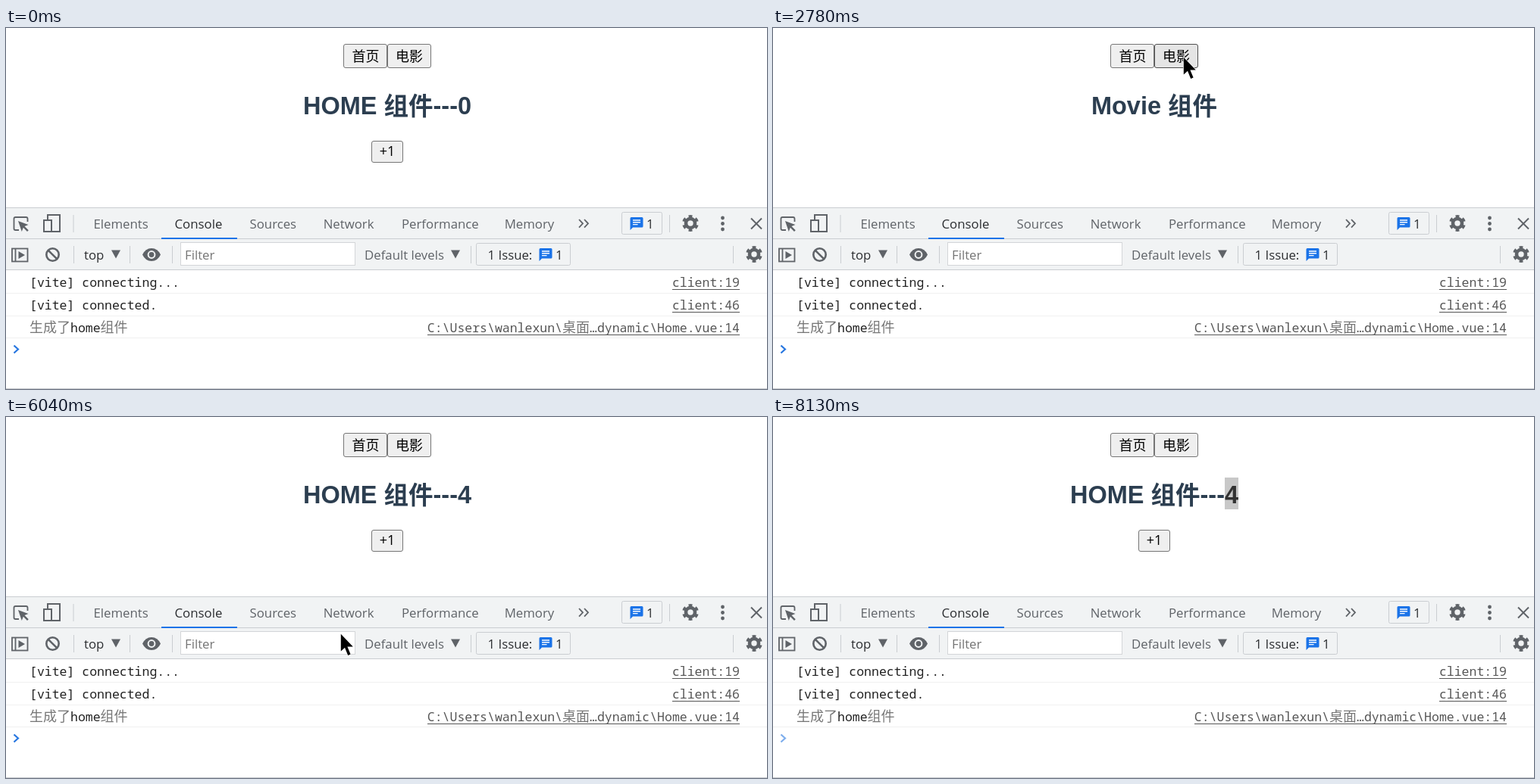
Write an HTML page that moves like this. It is 1004 px wide and 477 px high and loops after 8.26 s.

```html
<!DOCTYPE html>
<html lang="zh-CN">
<head>
<meta charset="utf-8">
<title>Dynamic components</title>
<style>
html, body { margin: 0; width: 100%; height: 100%; overflow: hidden; background: #fff; }
svg { display: block; width: 100%; height: 100%; }
text { white-space: pre; }
.ui { font: 16.8px "Open Sans", "Noto Sans", sans-serif; fill: #5f6368; }
.dark { fill: #2b2d30; }
.mono { font: 16.5px "Noto Sans Mono", "Noto Sans CJK SC", monospace; fill: #222; }
.link { fill: #555; text-anchor: end; }
.cjk { font-size: 18px; font-family: "Noto Sans CJK SC", sans-serif; font-weight: 300; fill: #777; }
.button { font: 18px "Open Sans", "Noto Sans CJK SC", sans-serif; text-anchor: middle; }
.title { font: bold 32.5px "Liberation Sans", "Noto Sans CJK SC", sans-serif; fill: #2c3e50; text-anchor: middle; }
.line { fill: none; stroke: #5f6368; stroke-width: 2; }
.thin { stroke-width: 1.8; }
.bold { stroke-width: 2.6; }
.chip { fill: #f1f3f4; stroke: #cacdd1; }
</style>
</head>
<body>
<svg viewBox="0 0 1004 477">
  <defs>
    <g id="gear" class="line">
      <circle r="6" stroke-width="4.6"/>
      <circle r="9.2" stroke-width="3.4" pathLength="12" stroke-dasharray="1 1" stroke-dashoffset="-.5"/>
    </g>
    <g id="message">
      <path d="M1.5 0H15.5Q17 0 17 1.5V12Q17 13.5 15.5 13.5H3.5L0 17V1.5Q0 0 1.5 0Z" fill="#1a73e8"/>
      <path d="M3.5 4H13.5M3.5 6.8H13.5M3.5 9.6H10" stroke="#fff" stroke-width="1.4"/>
    </g>
    <path id="down" d="M0 0H12L6 11Z" fill="#5f6368"/>
  </defs>

  <rect width="1004" height="477" fill="#fff"/>
  <g class="button">
    <g id="home"><rect x="445.5" y="21.5" width="57" height="31" rx="2.5"/><text x="474.5" y="44.3">首页</text></g>
    <g id="movie"><rect x="503.5" y="21.5" width="57" height="31" rx="2.5"/><text x="532" y="44.3">电影</text></g>
    <g id="plus"><rect x="482.5" y="149.5" width="41" height="28" rx="2.5"/><text x="503" y="169">+1</text></g>
  </g>
  <rect id="selection" x="596" y="80" width="18" height="42"/>
  <text id="homeTitle" class="title" x="503" y="114">HOME <tspan dy="1">组件</tspan><tspan dy="-1">---</tspan><tspan id="count">0</tspan></text>
  <text id="movieTitle" class="title" x="503" y="114">Movie <tspan dy="1">组件</tspan></text>

  <!-- toolbars -->
  <rect y="237" width="1004" height="83" fill="#f1f3f4"/>
  <path d="M0 237.5H1004M0 278.5H1004M0 319.5H1004M0 476.5H1004" stroke="#cacdd1"/>
  <path d="M89 247V270M875.5 247V270M89.5 288V311M163.5 288V311M219.5 288V311M613.5 288V311M959.5 288V311" stroke="#cacdd1"/>
  <rect x="205" y="277" width="100" height="2" fill="#1a73e8"/>

  <path class="line thin" d="M17 267H12.5Q10.5 267 10.5 265V252Q10.5 250 12.5 250H26.5Q28.5 250 28.5 252V256"/>
  <path d="M16 255L29.5 260L24.5 262L29.8 267.3L28 269L22.8 263.8L20.8 269Z" fill="#5f6368"/>
  <path class="line" d="M55 253V247H71V269H61"/>
  <rect class="line" x="50" y="254" width="10" height="15"/>
  <g class="ui">
    <text x="115.5" y="265">Elements</text>
    <text class="dark" x="222.5" y="265">Console</text>
    <text x="321.5" y="265">Sources</text>
    <text x="418.7" y="265">Network</text>
    <text x="522" y="265">Performance</text>
    <text x="657.7" y="265">Memory</text>
  </g>
  <path class="line thin" d="M756 253L761 258.3L756 263.6M763 253L768 258.3L763 263.6"/>
  <rect class="chip" x="812.5" y="243.5" width="53" height="29" rx="2"/>
  <use href="#message" x="823.5" y="250"/>
  <text class="ui dark" x="845" y="265">1</text>
  <use href="#gear" x="903" y="258"/>
  <g fill="#5f6368"><circle cx="945.5" cy="251" r="2.4"/><circle cx="945.5" cy="258.5" r="2.4"/><circle cx="945.5" cy="266" r="2.4"/></g>
  <path class="line" d="M983 251.5L997 265.5M997 251.5L983 265.5"/>

  <rect class="line thin" x="8" y="291.5" width="20.5" height="17"/>
  <path class="line thin" d="M12.5 292V308"/>
  <path d="M16.5 295V305L25 300Z" fill="#5f6368"/>
  <circle class="line bold" cx="61.5" cy="299.5" r="8.2"/>
  <path class="line bold" d="M55.8 293.8L67.2 305.2"/>
  <text class="ui dark" x="103" y="306">top</text>
  <use href="#down" x="139" y="293.5"/>
  <path d="M180 299.5Q184 291 192 291T204 299.5Q200 308 192 308T180 299.5Z" fill="#5f6368"/>
  <circle cx="192" cy="299.5" r="4.4" fill="#5f6368" stroke="#f1f3f4" stroke-width="2"/>
  <rect x="230.5" y="283.5" width="230" height="30" fill="#fff" stroke="#d3d5d8"/>
  <text class="ui" x="236" y="306" style="fill:#757575">Filter</text>
  <text class="ui" x="473" y="306">Default levels</text>
  <use href="#down" x="587" y="293.5"/>
  <rect class="chip" x="620.5" y="284.5" width="124" height="29" rx="2"/>
  <text class="ui dark" x="635.5" y="306">1 Issue:</text>
  <use href="#message" x="703.5" y="291"/>
  <text class="ui dark" x="725" y="306">1</text>
  <use href="#gear" x="987" y="299"/>

  <!-- console -->
  <path d="M0 350.5H1004M0 380.5H1004M0 409.5H1004" stroke="#f0f0f0"/>
  <g class="mono">
    <text x="31" y="342">[vite] connecting...</text>
    <text x="31" y="372">[vite] connected.</text>
    <text x="31" y="402"><tspan class="cjk">生成了</tspan>home<tspan class="cjk">组件</tspan></text>
    <text class="link" x="968" y="342">client:19</text>
    <text class="link" x="968" y="372">client:46</text>
    <text class="link" x="968" y="402">C:\Users\wanlexun\<tspan class="cjk">桌面</tspan>…dynamic\Home.vue:14</text>
  </g>
  <path d="M879 345.5H968M879 375.5H968M556 405.5H968" stroke="#555"/>
  <path id="prompt" d="M10.5 419.5L16 424.5L10.5 429.5" fill="none" stroke="#2676e0" stroke-width="2.2"/>

  <g id="cursor">
    <path id="arrow" d="M.8 .8V23.5L6 18.8L10.2 29L13.6 27.6L9.4 17.4H16.8Z" stroke="#fff" stroke-width="1.2" paint-order="stroke"/>
    <path id="beam" d="M-4 -11.5H-1L0 -10.5L1 -11.5H4M0 -10.5V10.5M-4 11.5H-1L0 10.5L1 11.5H4" fill="none" stroke="#000" stroke-width="1.8"/>
    <circle id="halo" cx="-.5" cy="-.5" r="18" fill="#f8f400" opacity=".6"/>
  </g>
</svg>
<script>
const LOOP = 8260, STEP = 68;
const el = id => document.getElementById(id);

// Pointer journeys: waypoints of [ms, x, y].
const journeys = [
  [[70, 392, 465], [350, 430, 300], [560, 495, 125], [650, 512, 103], [818, 515, 157]],
  [[2040, 516, 150], [2180, 532, 85], [2312, 541, 38]],
  [[3440, 532, 39], [3712, 464, 42]],
  [[4850, 455, 60], [5190, 68, 452], [5394, 31, 435], [5598, 57, 432]],
  [[5690, 62, 432], [5850, 135, 430], [6150, 645, 190], [6300, 655, 73], [6506, 613, 97]],
  [[6580, 607, 100]],
  [[6850, 607, 98], [6986, 606, 97], [7200, 690, 200], [7400, 815, 365], [7530, 844, 455]]
];
const CURSOR_OUT = 7620;
const presses = [[1030, 1240], [1310, 1440], [1510, 1640], [1710, 1840],
                 [2650, 2780], [4520, 4650], [6580, 6650], [6850, 6990]];
const SELECTED = 6920, BLURRED = 8130;

const between = (t, a, b) => t >= a && t < b;

function pointerAt(t) {
  if (!between(t, 70, CURSOR_OUT)) return null;
  const path = journeys.filter(j => j[0][0] <= t).pop();
  const start = path[0][0];
  const now = start + Math.floor((t - start) / STEP) * STEP;
  const next = path.findIndex(p => p[0] > now);
  if (next < 0) return path[path.length - 1].slice(1);
  const [t0, x0, y0] = path[next - 1], [t1, x1, y1] = path[next];
  const k = (now - t0) / (t1 - t0);
  return [x0 + (x1 - x0) * k, y0 + (y1 - y0) * k];
}

const show = (id, on) => el(id).style.display = on ? '' : 'none';

function styleButton(id, x, y, w, h, pointer, pressed) {
  const over = pointer && between(pointer[0], x, x + w) && between(pointer[1], y, y + h);
  const [fill, stroke] = !over ? ['#efefef', '#767676']
    : pressed ? ['#f5f5f5', '#8d8d8d'] : ['#e5e5e5', '#4f4f4f'];
  const box = el(id).firstChild;
  box.setAttribute('fill', fill);
  box.setAttribute('stroke', stroke);
}

function draw(t) {
  const pointer = pointerAt(t);
  const pressed = presses.some(([a, b]) => between(t, a, b));
  const onMovie = between(t, 2780, 4650);

  show('homeTitle', !onMovie);
  show('movieTitle', onMovie);
  show('plus', !onMovie);
  el('count').textContent = presses.slice(0, 4).filter(p => t >= p[1]).length;
  styleButton('home', 445, 21, 58, 32, pointer, pressed);
  styleButton('movie', 503, 21, 58, 32, pointer, pressed);
  styleButton('plus', 482, 149, 42, 29, pointer, false);

  const selected = t >= SELECTED, blurred = t >= BLURRED;
  show('selection', selected);
  el('selection').setAttribute('fill', blurred ? '#c8c8c8' : '#3297fd');
  el('count').style.fill = !selected ? '' : blurred ? '#323232' : '#fff';
  el('prompt').setAttribute('opacity', selected ? .6 : 1);

  show('cursor', pointer);
  if (pointer) {
    const [x, y] = pointer;
    const overText = between(x, 391, 613) && between(y, 86, 120) || x > 25 && between(y, 411, 445);
    el('cursor').setAttribute('transform', `translate(${x} ${y})`);
    show('arrow', !overText);
    show('beam', overText);
    show('halo', pressed);
  }
}

function tick(now) {
  draw(now % LOOP);
  requestAnimationFrame(tick);
}
draw(0);
requestAnimationFrame(tick);
</script>
</body>
</html>
```
